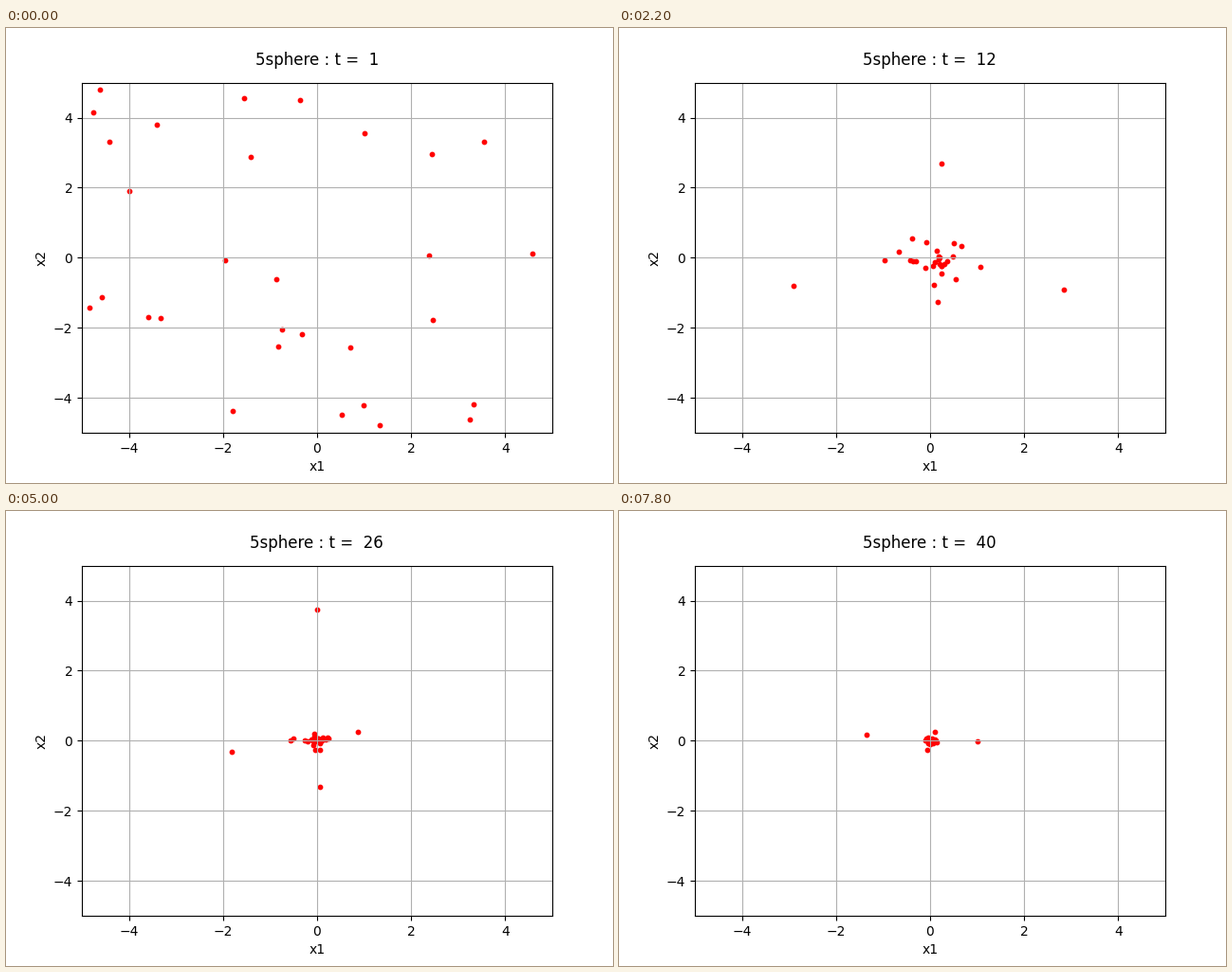
A matplotlib script that plays this animation: 640 by 480 pixels, repeating every 8 s.

```python
import numpy as np
import matplotlib.pyplot as plt
from matplotlib.animation import FuncAnimation

STEPS, INTERVAL, COUNT = 40, 200, 30
KEY_TIMES = [1, 5, 12, 17, 26, 33, 40]

# way points of the particles that stay farthest out
STRAGGLERS = np.array([
    [(-4.83, -1.43), (-2.62, -4.48), (-2.90, -0.80), (-2.52, -0.18),
     (-1.81, -0.32), (-1.57, 0.00), (-1.35, 0.16)],
    [(4.58, 0.11), (3.57, 0.09), (2.85, -0.91), (2.90, -0.15),
     (0.87, 0.25), (0.51, 0.11), (1.01, -0.02)],
    [(-0.36, 4.49), (0.12, 3.66), (0.24, 2.69), (0.10, 1.96),
     (0.00, 3.74), (-0.06, 0.58), (0.10, 0.25)],
    [(0.52, -4.49), (0.00, -4.35), (0.16, -1.25), (0.34, -0.69),
     (0.06, -1.31), (0.38, -1.18), (-0.06, -0.26)],
])

rng = np.random.default_rng(5)
size = (COUNT - len(STRAGGLERS), 2)
start = 4.8 * (2 * rng.random(size) ** (1.3, 1) - 1)
reach = rng.normal(0, 1, size) * (1.7, 1.4)
speed = rng.uniform(0.3, 0.9, size)
phase = rng.uniform(0, 2 * np.pi, size)


def straggler_points(t):
    pts = np.array([[np.interp(t, KEY_TIMES, axis) for axis in track.T]
                    for track in STRAGGLERS])
    if t > KEY_TIMES[1]:
        # swing out sideways between way points
        arc = np.sin(np.pi * (np.interp(t, KEY_TIMES, range(7)) % 1))
        far = np.clip(np.abs(pts[:, 0]) - 1.2, 0, 1)
        pts[:, 0] *= 1 + 0.6 * arc * far
    return pts


def swarm_points(t):
    """Collapse from the random start into shrinking orbits round the optimum."""
    hold = np.exp(-(t - 1) / 2.5)
    orbit = reach * np.sin(speed * t + phase) * np.exp(-t / 14)
    drift = 0.7 * np.exp(-t / 10) * np.cos(0.35 * (t - 5))
    return start * hold + (orbit + drift * np.array([-1, 1])) * (1 - hold)


def positions(t):
    return np.vstack([straggler_points(t), swarm_points(t)])


fig, ax = plt.subplots(figsize=(6.4, 4.8), dpi=100)
ax.set(xlim=(-5, 5), ylim=(-5, 5), xlabel="x1", ylabel="x2")
ax.set_xticks(range(-4, 5, 2))
ax.set_yticks(range(-4, 5, 2))
ax.grid(True)
dots = ax.scatter(*positions(1).T, s=10, c="red")
title = ax.text(0.4995, 1.05, "", transform=ax.transAxes, ha="center",
                fontsize=12)


def draw(i):
    dots.set_offsets(positions(i + 1))
    title.set_text(f"5sphere : t =  {i + 1}")
    return dots, title


anim = FuncAnimation(fig, draw, frames=STEPS, interval=INTERVAL,
                     repeat=True, repeat_delay=0)
plt.show()
```
